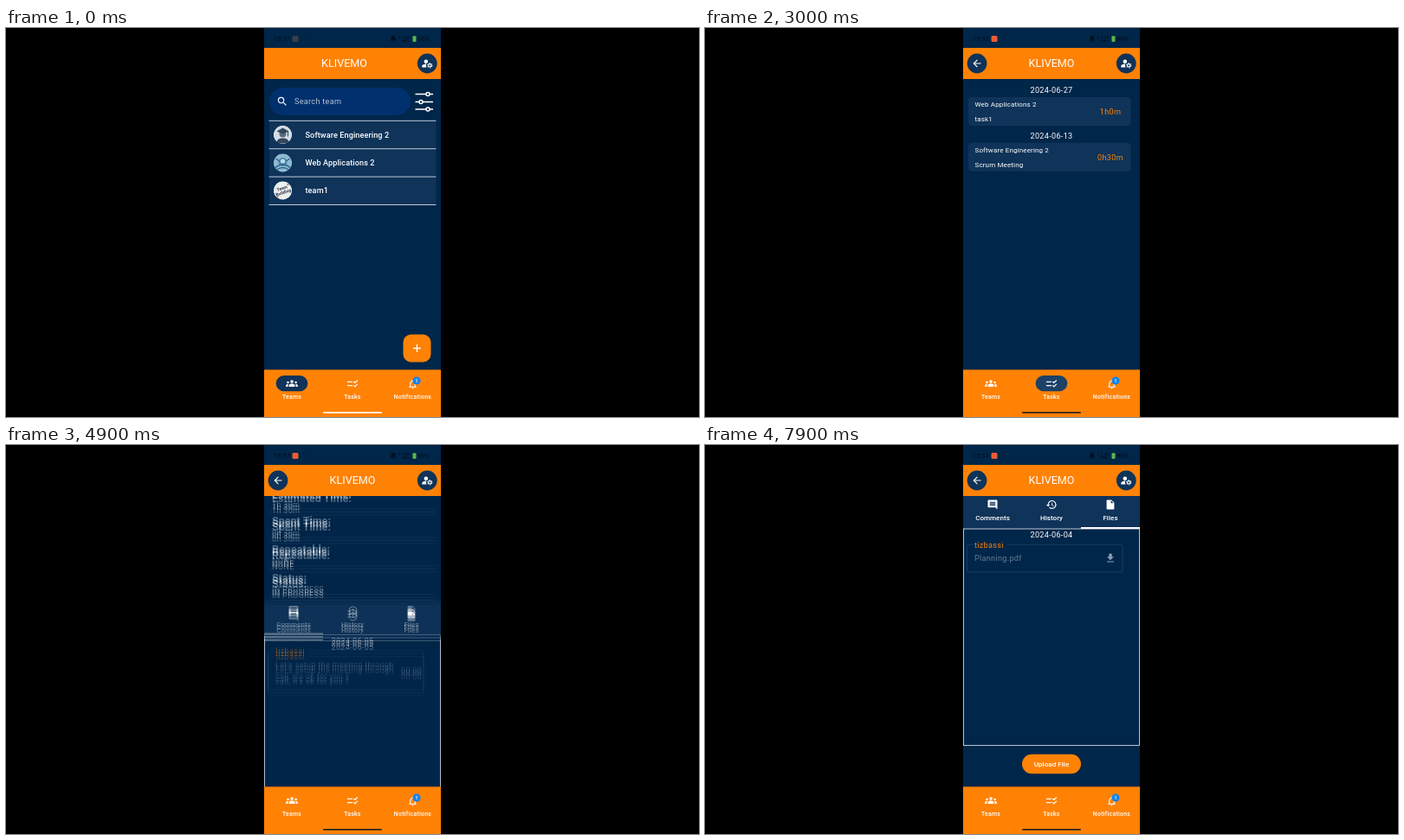
These frames come from a looping animation (800 by 450 pixels, 8 s). An HTML page:

```html
<!DOCTYPE html>
<html lang="en">
<head>
<meta charset="utf-8">
<title>Team planner walkthrough</title>
<style>
html, body { margin: 0; width: 100%; height: 100%; overflow: hidden; background: #000; }
svg { display: block; width: 100vw; height: 100vh; }
text { font-family: Roboto, "Open Sans", sans-serif; white-space: pre; }
</style>
</head>
<body>
<svg id="stage" viewBox="0 0 800 450"></svg>
<script>
const BG = '#00264a', PANEL = '#0f3359', ORANGE = '#ff8205', WHITE = '#fff', DIM = '#647c94';
const LOOP = 8000, STEP = 100, PAGE_W = 204;

const ICON = {
  search: 'M15.5 14h-.79l-.28-.27A6.47 6.47 0 0 0 16 9.5 6.5 6.5 0 1 0 9.5 16c1.61 0 3.09-.59 4.23-1.57l.27.28v.79l5 4.99L20.49 19l-4.99-5zm-6 0a4.5 4.5 0 1 1 0-9 4.5 4.5 0 0 1 0 9z',
  back: 'M20 11H7.83l5.59-5.59L12 4l-8 8 8 8 1.41-1.41L7.83 13H20v-2z',
  edit: 'M3 17.25V21h3.75L17.81 9.94l-3.75-3.75L3 17.25zM20.71 7.04a1 1 0 0 0 0-1.41l-2.34-2.34a1 1 0 0 0-1.41 0l-1.83 1.83 3.75 3.75 1.83-1.83z',
  trash: 'M6 19c0 1.1.9 2 2 2h8c1.1 0 2-.9 2-2V7H6v12zM19 4h-3.5l-1-1h-5l-1 1H5v2h14V4z',
  comment: 'M21.99 4c0-1.1-.89-2-1.99-2H4c-1.1 0-2 .9-2 2v12c0 1.1.9 2 2 2h14l4 4-.01-18zM18 14H6v-2h12v2zm0-3H6V9h12v2zm0-3H6V6h12v2z',
  history: 'M13 3a9 9 0 0 0-9 9H1l3.89 3.89.07.14L9 12H6a7 7 0 1 1 2.06 4.94l-1.42 1.42A9 9 0 1 0 13 3zm-1 5v5l4.28 2.54.72-1.21-3.5-2.08V8H12z',
  file: 'M6 2c-1.1 0-2 .9-2 2v16c0 1.1.9 2 2 2h12c1.1 0 2-.9 2-2V8l-6-6H6zm7 7V3.5L18.5 9H13z',
  send: 'M2 21l21-9L2 3v7l15 2-15 2v7z',
  download: 'M5 20h14v-2H5v2zM19 9h-4V3H9v6H5l7 7 7-7z',
  add: 'M19 13h-6v6h-2v-6H5v-2h6V5h2v6h6v2z',
  bell: 'M12 22c1.1 0 2-.9 2-2h-4c0 1.1.9 2 2 2zm6-6v-5c0-3.07-1.63-5.64-4.5-6.32V4c0-.83-.67-1.5-1.5-1.5s-1.5.67-1.5 1.5v.68C7.64 5.36 6 7.92 6 11v5l-2 2v1h16v-1l-2-2zm-2 1H8v-6c0-2.48 1.51-4.5 4-4.5s4 2.02 4 4.5v6z',
  user: 'M10 4a4 4 0 1 0 0 8 4 4 0 0 0 0-8zM10.7 13C7.6 12.9 2 14.4 2 18v2h9.5a7 7 0 0 1-.8-7z',
  people: 'M12 4.500a3.200 3.200 0 1 0 0 6.400 3.200 3.200 0 0 0 0-6.400zM6 18v-2.500c0-4.600 12-4.600 12 0V18zM4 7a2.300 2.300 0 1 0 0 4.600A2.300 2.300 0 0 0 4 7zM0 18v-2.500c0-2 2-3 4.800-2.800-.6 1-.8 2-.8 5.300zM20 7a2.300 2.300 0 1 0 0 4.600A2.300 2.300 0 0 0 20 7zM24 18v-2.500c0-2-2-3-4.800-2.800.6 1 .8 2 .8 5.300z'
};

// Drawing helpers
const text = (x, y, s, o = {}) =>
  `<text x="${x}" y="${y}" font-size="${o.size || 9.14}" font-weight="${o.weight || 400}" letter-spacing="${o.gap ?? 0.286}" fill="${o.fill || WHITE}" text-anchor="${o.mid ? 'middle' : 'start'}">${s}</text>`;
const rect = (x, y, w, h, fill, r = 0) =>
  `<rect x="${x}" y="${y}" width="${w}" height="${h}" rx="${r}" fill="${fill}"/>`;
const frame = (x, y, w, h, stroke, r = 0) =>
  `<rect x="${x}" y="${y}" width="${w}" height="${h}" rx="${r}" fill="none" stroke="${stroke}" stroke-width=".8"/>`;
const disc = (x, y, r, fill) => `<circle cx="${x}" cy="${y}" r="${r}" fill="${fill}"/>`;
const line = (d, stroke, w) => `<path d="${d}" fill="none" stroke="${stroke}" stroke-width="${w}"/>`;
const icon = (name, x, y, size = 13.7, fill = WHITE) =>
  `<path d="${ICON[name]}" fill="${fill}" transform="translate(${x - size / 2} ${y - size / 2}) scale(${size / 24})"/>`;
const group = (id, body, attrs = '') => `<g id="${id}" ${attrs}>${body}</g>`;
const date = (y, s, x = 400) => text(x, y, s, { mid: 1 });
const fab = (x, y, name) => rect(x, y, 32, 32, ORANGE, 9) + icon(name, x + 16, y + 16, 15.5);

// Outlined card with its owner's name set into the top border
const card = (y, w, h, owner, width, stroke) =>
  frame(302.5, y, w, h, stroke, 2) + rect(309, y - 2, width, 4, BG) +
  text(311, y + 3.3, owner, { fill: '#f47f12' });

function avatars() {
  const clip = (y, body) => `<g transform="translate(319.5 ${y})" clip-path="url(#round)">${body}</g>`;
  return clip(123.5, disc(0, 0, 10.7, '#d3dde4') + disc(0, -1, 4, '#596c7f') +
      '<path d="M-8 10Q-6 3 0 4Q6 3 8 10zM-7-4L0-8L7-4L0-1z" fill="#33465b"/>' + line('M6-4V2', '#33465b', 1)) +
    clip(156, disc(0, 0, 10.7, '#8fbbd2') + disc(0, -1, 5, '#4d87a8') + disc(0, -2, 2.6, '#bdd9e6') +
      line('M-9 6Q0-2 9 6M-7 8Q0 3 7 8M-8-5L-4-2M8-5L4-2', '#2b6488', 1.3)) +
    clip(188, disc(0, 0, 10.7, '#eceff0') +
      '<g transform="rotate(-18)">' + text(0, -1, 'Team', { mid: 1, size: 5, weight: 700, fill: '#2d3540', gap: 0 }) +
      text(0, 4, 'Building', { mid: 1, size: 5, weight: 700, fill: '#2d3540', gap: 0 }) + '</g>' +
      disc(-6, 7, 1.2, '#c58c55') + disc(6, -7, 1.2, '#7f95a5'));
}

function teams() {
  let s = rect(304, 69, 163, 32, '#00306e', 16) + icon('search', 319, 85) +
    text(333, 88.4, 'Search team', { fill: '#b4c1d2' }) +
    line('M472.500 76.500H493M472.500 85.500H493M472.500 94H493', WHITE, 1.7);
  for (const [x, y] of [[487, 76.5], [479, 85.5], [487, 94]])
    s += `<circle cx="${x}" cy="${y}" r="2" fill="${BG}" stroke="#fff" stroke-width="1.5"/>`;
  s += rect(304, 107, 192.5, 97.5, PANEL);
  ['Software Engineering 2', 'Web Applications 2', 'team1'].forEach((name, i) =>
    s += text(345.5, 126.6 + i * 32.4, name, { weight: 500, gap: 0.086 }));
  for (let i = 0; i < 4; i++) s += line(`M303.500 ${107.3 + i * 32.4}H496.500`, '#d3dce5', 0.9);
  return s + avatars() + fab(458.5, 354.5, 'add');
}

function tasks() {
  const item = (y, day, team, name, spent) =>
    date(y + 75, day) + rect(304, y + 80, 187.5, 33, PANEL, 4) +
    text(311.5, y + 91, team, { size: 8, gap: 0.143 }) + text(311.5, y + 108, name, { size: 8, gap: 0.143 }) +
    text(468, y + 100, spent, { mid: 1, fill: ORANGE });
  return item(0, '2024-06-27', 'Web Applications 2', 'task1', '1h0m') +
    item(52.7, '2024-06-13', 'Software Engineering 2', 'Scrum Meeting', '0h30m');
}

function comments() {
  return frame(298.4, 434, 203.2, 209, '#dfe6ec') + date(444.4, '2024-06-05') +
    card(452, 179.5, 45.5, 'tizbassi', 40, '#1d446b') +
    text(311, 471, "Let's setup the meeting through", { fill: DIM }) +
    text(311, 484.7, "call, it's ok for you ?", { fill: DIM }) + text(456, 478, '00:00', { fill: DIM }) +
    frame(298.4, 647, 203.2, 80, '#a9b8c6') + text(307, 666.3, 'Add a comment', { fill: '#a3b3c3' }) +
    icon('send', 488, 687, 13.7, '#c4ced8');
}

function history() {
  const entry = (y, owner, w, s) => card(y, 189.5, 31.5, owner, w, '#74899d') + text(311.5, y + 18.7, s);
  return date(450, '2024-06-15', 395.5) + entry(458, 'fontivra38', 47, 'Task Edited.') +
    date(501.6, '2024-06-04', 395.5) + entry(509.7, 'tizbassi', 40, 'File Planning.pdf uploaded.') +
    entry(547.8, 'fontivra38', 47, 'Task Scrum Meeting created.');
}

function files() {
  return frame(298.4, 434, 203.2, 250.5, '#e8edf2') + date(444.2, '2024-06-04') +
    card(452.3, 179.5, 31.5, 'tizbassi', 40, '#1d446b') +
    text(311, 471.2, 'Planning.pdf', { fill: DIM }) + icon('download', 468, 468, 13.7, '#8d9fb0') +
    rect(366, 694.7, 68, 22.6, ORANGE, 11.3) +
    text(400, 708.9, 'Upload File', { mid: 1, size: 8, weight: 500, gap: 0.06 });
}

function details() {
  const rows = [['Name', 'Scrum Meeting'], ['Description', 'Daily brief.'], ['Category', 'MEETING'],
    ['Priority', 'LOW'], ['Deadline', '2024-06-13'], ['Estimated Time', '1h 30m'],
    ['Spent Time', '0h 30m'], ['Repeatable', 'NONE'], ['Status', 'IN PROGRESS']];
  let s = '';
  rows.forEach(([k, v], i) => {
    const y = i * 32.95;
    s += text(307, y + 108.7, k + ':', { size: 12.57, weight: 700, gap: 0, fill: '#f3f6f9' }) +
      text(307, y + 121.3, v, { fill: '#f0f3f6' }) + line(`M304 ${y + 123.7}H496.500`, '#3b5168', 0.8);
  });
  s += fab(422.5, 65, 'edit') + fab(460.2, 65, 'trash') + rect(298, 393, 204, 41, PANEL);
  [['comment', 'Comments'], ['history', 'History'], ['file', 'Files']].forEach(([name, label], i) => {
    const x = 332 + i * 68;
    s += icon(name, x, 406, 13.2) + text(x, 424.4, label, { mid: 1, size: 8, weight: 500, gap: 0.06 });
  });
  return s + `<rect class="mark" x="298" y="432" width="68" height="2" fill="#fff"/>` +
    `<g class="pager">${[comments, history, files].map((page, i) =>
      `<g transform="translate(${i * PAGE_W})">${page()}</g>`).join('')}</g>`;
}

function chrome() {
  const dark = '#03101f', tab = { mid: 1, size: 6.86, weight: 500 };
  return rect(298, 0, 204, 23, BG) + rect(298, 23, 204, 36, ORANGE) + rect(298, 395.3, 204, 55, ORANGE) +
    text(309, 14.8, '15:57', { size: 7.3, weight: 500, fill: dark, gap: 0.1 }) +
    `<rect id="rec" x="330.500" y="9" width="7" height="7" rx="1.500"/>` +
    disc(347, 12.5, 0.8, '#0b2038') +
    `<path d="M447 8.500q2.500.5 2.500 4l1 2h-7l1-2q0-3.500 2.500-4zM446 15h2v1h-2z" fill="${dark}"/>` +
    text(453, 11.8, '4.1 4G', { size: 4, weight: 700, fill: dark }) +
    text(457, 16.2, 'KB/s', { size: 4, weight: 700, fill: dark, gap: 0 }) +
    rect(469.5, 9.3, 4, 6.7, '#58b947', 1) +
    text(475, 14.8, '90%', { size: 7.3, weight: 500, fill: dark, gap: 0 }) +
    group('title', text(400, 45.4, 'KLIVEMO', { mid: 1, size: 12.57, gap: 0 })) +
    group('back', disc(314, 41, 11.4, PANEL) + icon('back', 314, 41)) +
    disc(486.3, 41, 11.4, PANEL) + icon('user', 486, 41) +
    '<circle cx="489.300" cy="43.300" r="1.700" fill="none" stroke="#fff" stroke-width="1.200"/>' +
    '<circle cx="489.300" cy="43.300" r="2.700" fill="none" stroke="#fff" stroke-width="1" stroke-dasharray="1.400 1.427"/>' +
    `<rect id="pill" y="402" width="36.600" height="18.300" rx="9.150" fill="${PANEL}"/>` +
    icon('people', 330, 411.5) +
    line('M394 409.300H400M394 413.700H400M401.300 409l1.500 1.500 3-3M401.300 413.400l1.500 1.500 3-3', WHITE, 1.2) +
    icon('bell', 469.5, 412, 13) + disc(474, 408, 4.6, '#1583ea') +
    text(474, 410.2, '1', { mid: 1, size: 6, weight: 500, gap: 0 }) +
    text(330, 429.4, 'Teams', tab) + text(400, 429.4, 'Tasks', tab) + text(469.5, 429.4, 'Notifications', tab) +
    `<rect id="home" x="366" y="444" width="68" height="1.800" rx=".9"/>`;
}

const stage = document.getElementById('stage');
const view = body => rect(298, 59, 204, 337, BG) + `<g class="scroll">${body}</g>`;
stage.innerHTML =
  '<defs><clipPath id="body"><rect x="298" y="59" width="204" height="336.500"/></clipPath>' +
  '<clipPath id="round"><circle r="10.700"/></clipPath></defs>' +
  rect(0, 0, 800, 450, '#000') + rect(298, 0, 204, 450, BG) +
  '<g clip-path="url(#body)">' + group('teams', teams()) + group('tasks', tasks()) +
  group('info', [0, 1, 2].map(() => `<g class="layer">${view(details())}</g>`).join('')) + '</g>' +
  chrome() + `<circle id="touch" r="5" fill="#b9c4cf" fill-opacity=".65" stroke="#8b9dae" stroke-width=".6"/>`;

const el = id => document.getElementById(id);
const layers = [...stage.querySelectorAll('.layer')].map(root => ({
  root,
  scroll: root.querySelector('.scroll'),
  pager: root.querySelector('.pager'),
  mark: root.querySelector('.mark')
}));

// Timing
const clamp = u => Math.max(0, Math.min(1, u));
const smooth = u => u * u * (3 - 2 * u);
const fade = (t, start) => smooth(clamp((t - start) / 550));
function track(t, keys) {
  let v = keys[0][1];
  for (let i = 1; i < keys.length; i++) {
    const [t0, v0] = keys[i - 1], [t1, v1] = keys[i];
    if (t >= t0) v = v0 + (v1 - v0) * clamp((t - t0) / (t1 - t0));
  }
  return v;
}
const TO_TASKS = 1500, TO_INFO = 3340;
const SCROLL = [[4250, 0], [4900, 207.5], [4940, 214.5], [5080, 230], [5250, 235], [5722, 235], [5740, 337]];
const PAGE = [[6150, 0], [6300, 0.7], [6450, 1], [7220, 1], [7240, 1.127], [7380, 1.8], [7550, 2]];
const pose = t => ({ scroll: track(t, SCROLL), page: track(t, PAGE) });
const show = (node, on) => node.setAttribute('visibility', on ? 'visible' : 'hidden');
const shift = (node, x, y) => node.setAttribute('transform', `translate(${x} ${y})`);

function fadeTo(node, a) {
  node.setAttribute('opacity', a);
  node.setAttribute('display', a > 0 ? 'inline' : 'none');
}

function draw(now) {
  const t = Math.floor((now % LOOP) / STEP) * STEP;
  const a = fade(t, TO_TASKS), b = fade(t, TO_INFO), root = t < TO_TASKS;

  fadeTo(el('teams'), 1 - a);
  fadeTo(el('tasks'), a * (1 - b));
  fadeTo(el('info'), b);

  // Blend three nearby moments while the content moves
  const first = pose(t);
  layers.forEach((layer, i) => {
    const p = pose(t + i * 20);
    const moved = p.scroll !== first.scroll || p.page !== first.page;
    fadeTo(layer.root, i === 0 ? 1 : moved ? 1 / (i + 1) : 0);
    shift(layer.scroll, 0, -p.scroll);
    shift(layer.pager, -p.page * PAGE_W, 0);
    shift(layer.mark, p.page * 68, 0);
  });

  shift(el('title'), root ? -9.5 : 0, 0);
  show(el('back'), !root);
  show(el('pill'), t < TO_INFO);
  el('pill').setAttribute('x', root ? 311.7 : 381.7);
  el('pill').setAttribute('fill', root ? PANEL : '#1d4167');
  el('home').setAttribute('fill', t < 700 ? '#fff' : '#2c2620');
  el('rec').setAttribute('fill', t < STEP ? '#3a3f49' : '#ee5a35');

  const drag = t >= 5600 && t < 5800, tap = t >= 7100 && t < 7300;
  show(el('touch'), drag || tap);
  shift(el('touch'), drag ? 394 : 451, drag ? 174.7 : 90.3);
}

const began = performance.now();
function tick() {
  draw(performance.now() - began);
  requestAnimationFrame(tick);
}
tick();
</script>
</body>
</html>
```
